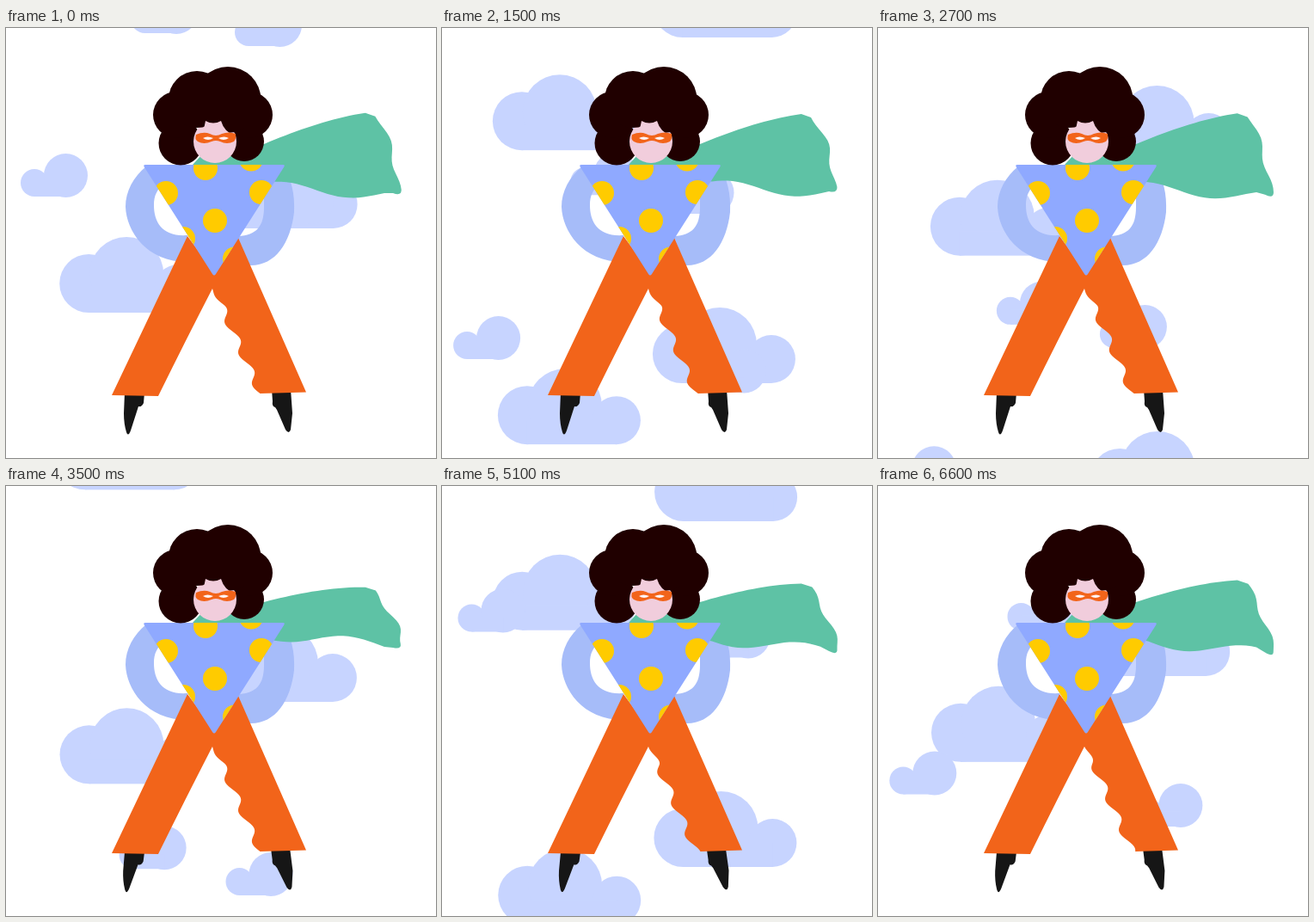
An HTML page with a canvas for the animation above (6700 ms loop, 500 by 500 pixels).

```html
<!DOCTYPE html>
<html lang="en">
<head>
<meta charset="utf-8">
<title>Caped hero</title>
<style>
  html, body { margin: 0; width: 100%; height: 100%; overflow: hidden; background: #fff; }
  canvas { display: block; width: 500px; height: 500px; }
</style>
</head>
<body>
<canvas id="stage" width="500" height="500"></canvas>
<script>
const ctx = document.getElementById('stage').getContext('2d');
const LOOP = 6700, STEP = 100, BEATS = 14, SMALL_CYCLE = 5310;
const SKY = '#c7d4ff', CAPE = '#5ec2a5', ARM = '#a6bcf9', TOP = '#8fa9ff', DOT = '#ffcb00',
      HAIR = '#200000', SKIN = '#f1cddc', ORANGE = '#f2641a', SHOE = '#161616';

const lerp = (a, b, k) => a + (b - a) * k;

// Cyclic swing that peaks at the given beat.
const wave = (beat, peak, beats = BEATS) => Math.cos((beat - peak) / beats * Math.PI * 2);

function fill(color, path) {
  ctx.fillStyle = color;
  ctx.fill(typeof path === 'string' ? new Path2D(path) : path);
}

function disc(color, x, y, r) {
  ctx.fillStyle = color;
  ctx.beginPath();
  ctx.arc(x, y, r, 0, Math.PI * 2);
  ctx.fill();
}

// ---- clouds ----
function bigCloud(x, y) {
  disc(SKY, x + 34, y + 54, 34);
  disc(SKY, x + 78, y + 43, 43);
  disc(SKY, x + 138, y + 60, 28);
  ctx.fillRect(x + 34, y + 60, 104, 28);
}

function smallCloud(x, y) {
  disc(SKY, x + 16, y + 33, 16);
  disc(SKY, x + 52.5, y + 24.5, 25.5);
  ctx.fillRect(x + 16, y + 32, 37, 17);
}

const leftX = y => 62 + 4 * Math.sin((y - 233) / 200);
const rightX = y => 244.5 + 3.5 * Math.cos((y - 2) / 420 * Math.PI * 2);

// Start height, speed in px per ms, and sideways drift of each small cloud.
const smalls = [
  { y: 147, v: .126, x: u => 12.5 + 4.5 * Math.exp(-u / 750) },
  { y: -43, v: .1255, x: u => 141 + 10 * Math.cos((u - 1000) / 900) },
  { y: -28, v: .13, x: u => 266 - .003 * u },
  { y: 178, v: .131, x: u => 303 - .0028 * u }
];

function clouds(t) {
  for (let i = 0; i < 3; i++) {
    const yl = 243 + .1021 * t - 342 * i, yr = 145 + .12 * t - 402 * i;
    bigCloud(leftX(yl), yl);
    bigCloud(rightX(yr), yr);
  }
  for (const c of smalls)
    for (const u of [t, t - SMALL_CYCLE]) smallCloud(c.x(u), c.y + c.v * u);
}

// ---- cape: waves run along the top, down the free edge and back along the hem ----
function cape(beat) {
  const p = new Path2D();
  const topY = s => 108 + 27 * (1 - s) ** 1.6 + 10 * s * wave(beat, 6.8);
  const hemY = x => 180 + (x - 322) * .08
    + 13 * Math.max(0, Math.sin((x - 310) / 140 * Math.PI)) * wave(beat, (x - 410) / 22 - .2);
  const cornerY = 190 + 8 * wave(beat, 11.3);

  p.moveTo(217, 159);
  p.lineTo(228, 147);
  p.lineTo(270, 142);
  for (let s = 0; s <= 1; s += .05) p.lineTo(lerp(300, 424, s), topY(s));
  for (let k = .05; k < .97; k += .05) {
    const belly = Math.sin(k * Math.PI);
    p.lineTo(lerp(427, 460, k) + belly * (6 + 5 * wave(beat, 2 + (k - .4) * 18)),
             lerp(topY(1), cornerY, k));
  }
  p.quadraticCurveTo(460, cornerY + 3, 450, lerp(hemY(446), cornerY, .6));
  for (let x = 440; x >= 314; x -= 6) p.lineTo(x, hemY(x));
  p.lineTo(290, 176);
  p.closePath();
  fill(CAPE, p);
}

// ---- figure ----
function arms() {
  fill(ARM, 'M163 161C148 173 139 190 139 208C140 236 163 272 211 272L211 241C182 243 172 226 172 206C172 195 175 188 185 180L180 160Z');
  fill(ARM, 'M322 161C332 174 336 194 335 214C331 250 313 276 285 276L258 270L270 242C291 241 300 231 300 208L300 180Z');
}

function pants(beat) {
  const p = new Path2D('M211 242L123 427L177 428Q210 361 240 303');
  const crest = 355 + 7 * wave(beat, 0, BEATS / 2);
  for (let y = 303; y <= 425; y += 2) {
    const k = (y - 303) / 122, grow = Math.min(1, k * 6);
    p.lineTo(240 + 54 * k + grow * (1.5 + 5 * wave(y, crest, 36)), y);
  }
  p.lineTo(349, 423.5);
  p.lineTo(270, 244);
  p.lineTo(242, 284);
  p.closePath();
  fill(ORANGE, p);
}

function shoe(path, x, y, deg) {
  ctx.save();
  ctx.translate(x, y);
  ctx.rotate(deg * Math.PI / 180);
  ctx.translate(-x, -y);
  fill(SHOE, path);
  ctx.restore();
}

function shoes(beat) {
  const lean = Math.max(0, wave(beat, 8.5));
  shoe('M138 424L161 424L160 436Q158 441 154 440L145 468Q142 476 140 470Q137 460 137 448Z', 150, 428, 3 * lean);
  shoe('M309 420L331 420L333 448L331 467Q329 473 325 467L315 444L313 441Q309 440 310 434Z', 320, 440, -4 * lean);
}

const triangle = new Path2D('M162 159L322 159Q325 159 323 162L244 286Q242 289 240 286L161 162Q159 159 162 159Z');
const dots = [[232, 163], [285, 152.5], [186, 192], [297, 191], [243, 224], [206, 245], [266, 268.5]];

function torso() {
  fill(TOP, triangle);
  ctx.save();
  ctx.clip(triangle);
  for (const [x, y] of dots) disc(DOT, x, y, 14);
  ctx.restore();
}

function head() {
  disc(HAIR, 203, 134, 25.5);
  disc(HAIR, 277, 132, 23);
  disc(SKIN, 243, 132, 25);
  disc(HAIR, 198, 101, 27);
  disc(HAIR, 283, 101, 27);
  disc(HAIR, 222, 83, 33);
  disc(HAIR, 258, 83.5, 38.5);
  fill(SKIN, 'M219 127Q231 120 232 108Q241 113 250 108Q254 122 267 125L243 134Z');
  fill(ORANGE, 'M221 124Q230 120 237 123Q244 127 251 123Q259 120 267 123Q268 129 265 132Q257 136 249 132Q244 130 239 132Q230 136 223 132Q219 129 221 124Z');
  fill('#fff4f6', 'M229 128Q234 125 241 128Q235 132 229 128ZM247 128Q254 125 259 128Q253 132 247 128Z');
}

function draw(now) {
  const step = Math.floor(now % LOOP / STEP), beat = step % BEATS;
  ctx.fillStyle = '#fff';
  ctx.fillRect(0, 0, 500, 500);
  clouds(step * STEP);
  arms();
  cape(beat);
  shoes(beat);
  pants(beat);
  torso();
  head();
}

function tick() {
  draw(performance.now());
  requestAnimationFrame(tick);
}
tick();
</script>
</body>
</html>
```
